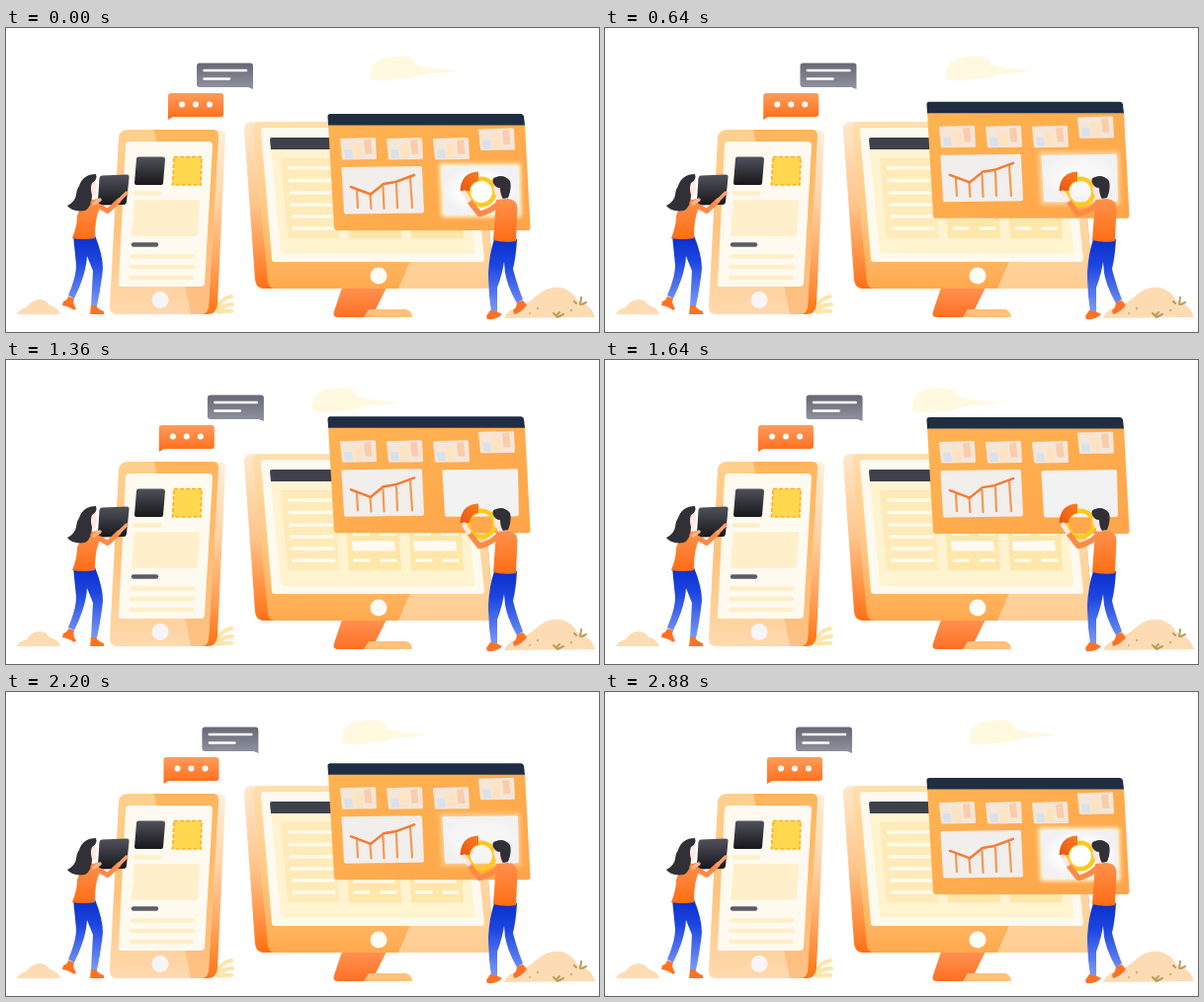
Write an HTML page that moves like this. It is 600x308 px and loops after 2.92 s.

```html
<!DOCTYPE html>
<html lang="en">
<head>
<meta charset="utf-8">
<title>Interface builders</title>
<style>
html, body { margin: 0; width: 100%; height: 100%; overflow: hidden; background: #fff; }
svg { display: block; width: 100%; height: 100%; }
.line { fill: none; stroke-linecap: round; stroke-linejoin: round; }
</style>
</head>
<body>
<svg viewBox="0 0 600 308">
<defs>
  <linearGradient id="phone" x2="0" y2="1"><stop stop-color="#ffd08e"/><stop offset=".5" stop-color="#ffc27a"/><stop offset="1" stop-color="#ffd9ae"/></linearGradient>
  <linearGradient id="front" x2="0" y2="1"><stop stop-color="#ffb55c"/><stop offset=".5" stop-color="#ffbd72"/><stop offset="1" stop-color="#ffc084"/></linearGradient>
  <linearGradient id="edge" x2="0" y2="1"><stop stop-color="#fff0dd"/><stop offset=".4" stop-color="#ffd2a4"/><stop offset=".75" stop-color="#ff9f55"/><stop offset="1" stop-color="#ff7514"/></linearGradient>
  <linearGradient id="side" x2="0" y2="1"><stop stop-color="#ffe8ca"/><stop offset=".5" stop-color="#ffc48b"/><stop offset="1" stop-color="#ff7014"/></linearGradient>
  <linearGradient id="frame" x2="0" y2="1"><stop stop-color="#ffdfb0"/><stop offset=".6" stop-color="#ffc57c"/><stop offset="1" stop-color="#ffa94d"/></linearGradient>
  <linearGradient id="sheen" x2="0" y2="1"><stop stop-color="#ffe0b8"/><stop offset="1" stop-color="#ffce94"/></linearGradient>
  <linearGradient id="pane" x2="1" y2="1"><stop stop-color="#ffb352"/><stop offset="1" stop-color="#ffa54a"/></linearGradient>
  <linearGradient id="dark" x2="0" y2="1"><stop stop-color="#50525b"/><stop offset="1" stop-color="#17171b"/></linearGradient>
  <linearGradient id="gray" x2="0" y2="1"><stop stop-color="#666975"/><stop offset="1" stop-color="#9093a0"/></linearGradient>
  <linearGradient id="chat" x2="0" y2="1"><stop stop-color="#ff9c5c"/><stop offset="1" stop-color="#ff6c19"/></linearGradient>
  <linearGradient id="shirt" x2="0" y2="1"><stop stop-color="#ff914c"/><stop offset="1" stop-color="#ff6d14"/></linearGradient>
  <linearGradient id="jeans" x2="0" y2="1"><stop stop-color="#0b2fcb"/><stop offset=".35" stop-color="#1c45df"/><stop offset="1" stop-color="#7c9af8"/></linearGradient>
  <linearGradient id="neck" x2="0" y2="1"><stop stop-color="#ff9350"/><stop offset="1" stop-color="#ff6f25"/></linearGradient>
  <linearGradient id="wedge" x1="0" y1="1" x2="1" y2="0"><stop stop-color="#ea5413"/><stop offset="1" stop-color="#fb7e20"/></linearGradient>
  <radialGradient id="shine"><stop stop-color="#fff"/><stop offset=".6" stop-color="#fdfdfd"/><stop offset="1" stop-color="#f1f1f4"/></radialGradient>
  <filter id="blur" x="-20%" y="-30%" width="140%" height="160%"><feGaussianBlur stdDeviation="2"/></filter>
  <g id="thumb">
    <path d="M1 1 34 0Q35.500 0 36 1L37 21Q37 22 36 22L3 22.500Q2 22.500 2 21.500L0 2Q0 1 1 1Z" fill="#f5e6d8"/>
    <path d="M4 12H12L13 21H5Z" fill="#d8e1ec"/>
    <path d="M13 6H22L23 21H14Z" fill="#fde3c1"/>
    <path d="M24 3 31 2 32.500 16.500H25.500Z" fill="#fbccab"/>
  </g>
  <path id="panel" d="M443 141 516 140Q518 140 518 142L519 186Q519 188 517 188L446 188.500Q444 188.500 444 186.500L441.500 143Q441 141 443 141Z"/>
</defs>

<path id="cloud" d="M368 51Q370 45 370 40Q376 29 391 29Q413 26 414 37Q428 41 458 43Q444 46 427 46Q405 53 386 53Q375 54 368 51Z" fill="#fff9e0"/>

<!-- sand and plants -->
<g fill="#fddcb4">
  <path d="M11 290Q13 285 21 283Q26 275 34 275Q41 275 44 281Q53 283 55 290Z"/>
  <path d="M504 294Q507 285 520 282Q531 277 537 271Q548 261 562 263Q573 266 578 276Q593 281 596 293Z"/>
</g>
<g fill="#d2ad72"><circle cx="538" cy="284" r="1.2"/><circle cx="572" cy="286" r="1.2"/><circle cx="530" cy="289" r="1"/></g>
<path class="line" d="M558 293 554 289M558 293 564 290M557 291 560 288M577 279 575 277M581 280 582 273M583 280 587 278" stroke="#bd9c5a" stroke-width="2"/>
<path class="line" d="M214 284Q217 274 228 272M214 287Q219 280 229 280M215 288Q221 286 228 287" stroke="#ffe5aa" stroke-width="4"/>

<!-- phone -->
<path d="M207 103H216Q222 103 222 110L214 280Q213 290 204 290H194Z" fill="url(#edge)"/>
<path d="M124 103H209Q215 103 215 109L205 282Q204 290 197 290H112Q105 290 105 282L114 111Q115 103 124 103Z" fill="url(#phone)"/>
<path d="M150 103H209Q215 103 215 109L205 282Q204 290 197 290H187Z" fill="url(#front)"/>
<path d="M125 115H205Q209 115 209 119L201 258Q201 262 197 262H117Q113 262 114 258L121 119Q121 115 125 115Z" fill="#fffaf0"/>
<circle cx="156" cy="275.500" r="8.500" fill="#f7f5f8"/>
<path d="M134 130.500H158Q161 130.500 161 133L159 157Q159 159 157 159H132Q130 159 130 157L132 132.500Q132 130.500 134 130.500Z" fill="url(#dark)"/>
<path d="M170 130.500H198L197 159H168.500Z" fill="#ffd84f" stroke="#ffad25" stroke-width="1.600" stroke-dasharray="4 2"/>
<path d="M132 174H194Q196 174 196 176L194 209Q194 211 192 211H129Q127 211 127 209L130 176Q130 174 132 174Z" fill="#fff0cb"/>
<g class="line" stroke="#ffefc8" stroke-width="4.500"><path d="M131 167.500H155M128 231.500H189M127 242H189M127 253H188"/><path d="M129 219.500H152" stroke="#5b5c66"/></g>

<!-- monitor -->
<path d="M340 263H385L373 287H368V293H336Q330 293 332 287Z" fill="url(#neck)"/>
<path d="M367 285H405Q411 287 411 293H362Z" fill="#ffc17c"/>
<path d="M249 95H480L494 264H262Q253 264 252 255L241 103Q241 95 249 95Z" fill="url(#side)"/>
<path d="M258 95H480L494 264H272Q266 264 265 257L250 102Q250 95 258 95Z" fill="url(#frame)"/>
<path d="M397 264 470 95H480L494 264Z" fill="url(#sheen)"/>
<path d="M261 101H470L484 234Q484 237 481 237H272Q269 237 269 234L258 105Q258 101 261 101Z" fill="#fffaef"/>
<path d="M268 123H464L474 226Q474 229 471 229H281Q278 229 278 226Z" fill="#fff3d0"/>
<path d="M269 111H470V123H268L267 113Q267 111 269 111Z" fill="#3e404b"/>
<path d="M278 132H333L337 213H285Z" fill="#ffebb9"/>
<path d="M343 140H396L400 213H347ZM406 140H459L463 213H410Z" fill="#ffe6a9"/>
<path class="line" d="M287 142H330M287 154.500H330M288 167H330M289 179H331M290 191H331M291 203H332M352 176H367M379 176H394M414 176H429M441 176H456M353 203H367M380 203H394M416 203H430M443 203H457" stroke="#fffbe9" stroke-width="3.500"/>
<path d="M350 183H393L394 193.500H351ZM412 183H455L456 193.500H413Z" fill="#fffaf0"/>
<circle cx="377" cy="251" r="8.500" fill="#fffbf5"/>

<!-- floating window -->
<g id="window">
  <path d="M326 97H525L530.500 202Q530.500 205 528 205H335Q332 205 332 202Z" fill="url(#pane)"/>
  <path d="M328 87H521Q523.500 87 524 89.500L525 98.500H326L325.500 89.500Q325.500 87 328 87Z" fill="#1f2e45"/>
  <use href="#thumb" x="338" y="111"/><use href="#thumb" x="385" y="111"/><use href="#thumb" x="432" y="111"/><use href="#thumb" x="478" y="101.500"/>
  <path d="M341 141 419 140Q421 140 421 142L423 185.500Q423 187.500 421 187.500L344 188.500Q342 188.500 342 186.500L339.500 143Q339 141 341 141Z" fill="#f1eeeb"/>
  <path class="line" d="M355 165 356 182M368.500 169 369.500 183M381.500 161 382.500 183M395 158 396 182M409 152 411 182" stroke="#f29a54" stroke-width="2.200"/>
  <path class="line" d="M349 161 369 168.500 382 158 394 156 413 149" stroke="#f47b34" stroke-width="2.500"/>
  <path id="glow" d="M441 140H518L519 189H443Z" fill="#fffbe4" stroke="#fffbe4" stroke-width="5" filter="url(#blur)"/>
  <use href="#panel" fill="#f2f2f2"/>
  <use id="lit" href="#panel" fill="url(#shine)"/>
</g>

<!-- chat bubbles -->
<g id="reply">
  <path d="M196 35.500H247Q250 35.500 250 38.500V62L245 60H196Q193 60 193 57V38.500Q193 35.500 196 35.500Z" fill="url(#gray)"/>
  <path class="line" d="M200.500 43H243M200.500 51.500H226" stroke="#fff" stroke-width="2.600"/>
</g>
<g id="typing">
  <path d="M167 66H217Q220 66 220 69V87Q220 90 217 90H169L164 93V69Q164 66 167 66Z" fill="url(#chat)"/>
  <g fill="#fff"><circle cx="178" cy="77.500" r="3"/><circle cx="192" cy="77.500" r="3"/><circle cx="206" cy="77.500" r="3"/></g>
</g>

<!-- woman with tile -->
<path d="M68 210H90Q98 230 98 244Q96 263 92 282H86L88 246 82 231Q81 250 69 274L63 271Q71 252 71 240Z" fill="url(#jeans)"/>
<path d="M63 272 69 274Q67 279 71 284L69 286Q64 282 57 281L58 277Q62 276 63 272ZM86 281H91Q93 285 99 287V290H85Z" fill="#ff7225"/>
<path d="M87 153Q93 154 92 163Q92 170 88 171L88 176 81 178 80 165Z" fill="#ffe8e0"/>
<path d="M75 183Q84 174 92 173L97 180Q90 188 90 213Q79 215 67 213Q72 201 72 190Z" fill="url(#shirt)"/>
<path d="M74 160Q78 148 91 148Q93 154 87 157Q85 162 87 169Q87 181 80 185Q67 187 62 180Q70 176 71 169Q71 164 74 160Z" fill="#303036"/>
<path d="M97 149.500 122 148.500Q125 148.500 124.500 151.500L122 176Q121.500 179 119 179L96 179.500Q93 179.500 93 176L94.500 152Q95 149.500 97 149.500Z" fill="url(#dark)"/>
<path class="line" d="M88 177 103 185.500 114 175" stroke="#ff8a45" stroke-width="5"/>
<path class="line" d="M114 175 122 167" stroke="#ffa06c" stroke-width="3.500"/>
<path class="line" d="M89 178 95 174" stroke="#ffb48b" stroke-width="3.500"/>

<!-- man with ring chart -->
<circle cx="481" cy="166" r="13.300" fill="none" stroke="#ffc91d" stroke-width="4.500"/>
<path d="M459.500 165Q460.500 146 478 145.500V155Q470 156 469 165Z" fill="url(#wedge)"/>
<path d="M494 214H517Q516 232 513 244Q517 260 523 275L517 279Q508 264 505 248L504 237Q502 250 497 263V288H491Q488 268 488 248Q489 229 494 214Z" fill="url(#jeans)"/>
<path d="M490 286 496 287 502 290Q497 296 487 295L486 292ZM517 278 523 276 527 281Q522 288 514 290L513 286Q517 283 517 278Z" fill="#ff7225"/>
<path d="M494 157Q492 168 497 171L497 177 506 178 506 158Z" fill="#ffe8e0"/>
<path d="M496 174 508 173Q517 174 517.500 182L516 216Q504 218 493 215L495 188Z" fill="url(#shirt)"/>
<path class="line" d="M498 178Q490 186 479 188.500L470 177" stroke="#ff8a45" stroke-width="5.500"/>
<path class="line" d="M468 174 463.500 167" stroke="#ffe8e0" stroke-width="5"/>
<path d="M493 157Q491 152 496 151Q504 148 510 155Q512 163 508 172L503 173Q500 169 500 162Q495 162 493 157Z" fill="#303036"/>
</svg>
<script>
const LOOP = 2920;
const part = id => document.getElementById(id);
const shift = (id, x, y) => part(id).setAttribute('transform', `translate(${x} ${y})`);

function draw(now) {
  const swing = (1 - Math.cos(2 * Math.PI * now / LOOP)) / 2;
  shift('window', 0, -30 * swing);
  shift('reply', 11 * swing, 0);
  shift('typing', -9.3 * swing, 0);
  shift('cloud', -60 * swing, 0);
  const light = Math.max(0, 1 - swing / 0.8);
  part('glow').setAttribute('opacity', light);
  part('lit').setAttribute('opacity', light);
  requestAnimationFrame(() => draw(performance.now()));
}
draw(performance.now());
</script>
</body>
</html>
```
